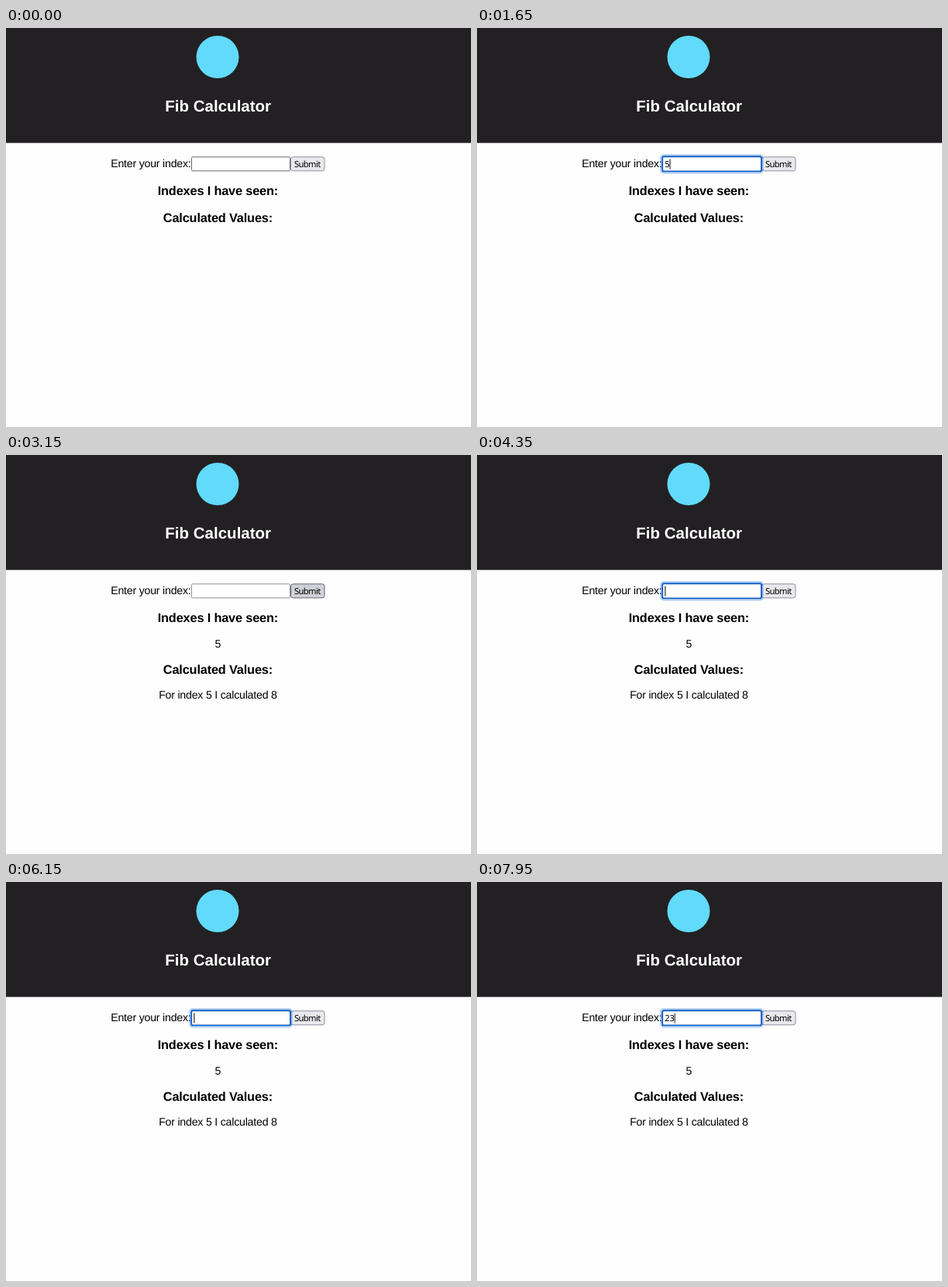
Animation of 600 by 516 pixels, one loop 8000 ms. Source, as an HTML page:

```html
<!DOCTYPE html>
<html lang="en">
<head>
<meta charset="utf-8">
<title>Fib Calculator</title>
<style>
  html, body { margin: 0; width: 100%; height: 100%; overflow: hidden; background: #fefefe; }
  svg { display: block; width: 600px; height: 516px; }
  text { font: 14.2px "Liberation Sans", Arial, sans-serif; letter-spacing: -.23px; fill: #000; text-rendering: geometricPrecision; }
  .mid { text-anchor: middle; }
  .title { font-size: 20.52px; font-weight: bold; letter-spacing: 0; fill: #fff; }
  .heading { font-size: 16.3px; font-weight: bold; letter-spacing: -.15px; }
  .control { font: 11.2px "Noto Sans", "Open Sans", sans-serif; letter-spacing: -.6px; }

  /* Every state change is a hard cut. */
  .focus, .five, .two, .three, .results, .values, .field, .button, .caret {
    animation: 8s step-end infinite;
  }
  .focus { animation-name: focus; }
  .five { animation-name: five; }
  .two { animation-name: two; }
  .three { animation-name: three; }
  .results { animation-name: results; }
  .values { animation-name: values; }
  .field { animation-name: field-hover; }
  .button { animation-name: button-hover; }
  .caret { animation-name: caret; }

  @keyframes focus {
    0%, 30.625% { opacity: 0; }
    5.625%, 49.375%, 100% { opacity: 1; }
  }
  @keyframes five {
    0%, 33.75%, 100% { opacity: 0; }
    16.875% { opacity: 1; }
  }
  @keyframes two {
    0% { opacity: 0; }
    81.25%, 100% { opacity: 1; }
  }
  @keyframes three {
    0% { opacity: 0; }
    96.25%, 100% { opacity: 1; }
  }
  @keyframes results {
    0% { opacity: 0; }
    35%, 100% { opacity: 1; }
  }
  @keyframes values {
    0% { transform: translateY(0); }
    35%, 100% { transform: translateY(32px); }
  }
  @keyframes field-hover {
    0% { stroke: #676774; }
    30%, 100% { stroke: #8f8f9d; }
  }
  @keyframes button-hover {
    0%, 42.5%, 100% { fill: #e9e9ed; stroke: #8f8f9d; }
    30% { fill: #d0d0d7; stroke: #676774; }
  }
  /* Blinks every 500 ms, restarting on focus and on each key. */
  @keyframes caret {
    0%, 11.875%, 23.125%, 30.625%, 55.625%, 68.125%, 80.625%, 87.5% { opacity: 0; transform: none; }
    5.625%, 49.375%, 61.875%, 74.375% { opacity: 1; transform: none; }
    16.875%, 29.375%, 81.25%, 93.75% { opacity: 1; transform: translateX(6.2px); }
    96.25%, 100% { opacity: 1; transform: translateX(12.4px); }
  }
</style>
</head>
<body>
<svg viewBox="0 0 600 516">
  <rect width="600" height="148.65" fill="#222022"/>
  <circle cx="273" cy="37.5" r="27.5" fill="#61dafb"/>
  <text class="mid title" x="273.7" y="108">Fib Calculator</text>

  <text x="135.2" y="180">Enter your index:</text>
  <rect class="field" x="239.5" y="166.8" width="127" height="18" rx="1.5" fill="#fff"/>
  <rect class="button" x="367.5" y="166.8" width="43.5" height="18" rx="3"/>
  <text class="mid control" x="388.8" y="180">Submit</text>

  <g class="focus">
    <rect x="237.2" y="164.2" width="131.6" height="23.2" rx="3.5" fill="none" stroke="#0060df" stroke-opacity=".3" stroke-width="2"/>
    <rect x="239.2" y="166.2" width="127.8" height="19.2" rx="2" fill="#fff" stroke="#0b5cc4" stroke-width="1.9"/>
  </g>
  <text class="control five" x="242.2" y="180">5</text>
  <text class="control two" x="242.2" y="180">2</text>
  <text class="control three" x="248.4" y="180">3</text>
  <rect class="caret" x="242.4" y="169.5" width="1" height="13" fill="#000"/>

  <text class="mid heading" x="273.4" y="216">Indexes I have seen:</text>
  <text class="mid heading values" x="273.4" y="251">Calculated Values:</text>
  <g class="results">
    <text class="mid" x="273.4" y="249">5</text>
    <text class="mid" x="273.4" y="315">For index 5 I calculated 8</text>
  </g>
</svg>
</body>
</html>
```
